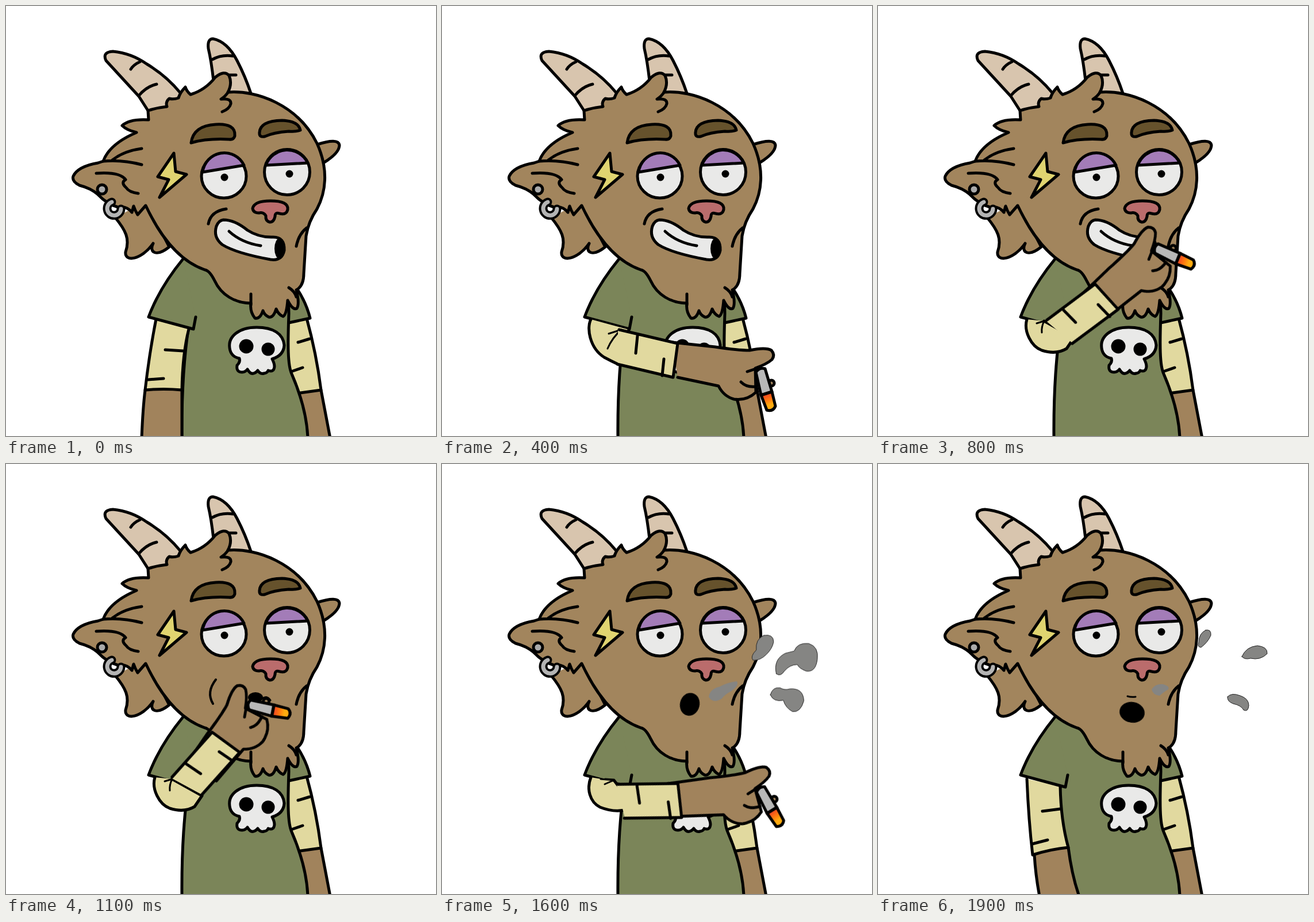
An HTML page without scripts for the animation above (2 s loop, 748 px wide and 748 px high).

```html
<!DOCTYPE html>
<html lang="en">
<head>
<meta charset="utf-8">
<title>Smoking goat</title>
<style>
html, body { margin: 0; width: 100%; height: 100%; overflow: hidden; background: #fff; }
svg { display: block; width: 100%; height: 100%; }
.ink { stroke: #000; stroke-width: 5; stroke-linecap: round; stroke-linejoin: round; fill: none; }
.fur { fill: #a2855d; }
.skin { fill: #a1835c; }
.shirt { fill: #7b8559; }
.wrap { fill: #e1d99f; }
.horn { fill: #d8c5ae; }
.bone { fill: #e9e9e8; }
.lid { fill: #a37cb8; }
.brow { fill: #66522c; }
.dark { fill: #000; }
.bare { stroke: none; }
.crease { stroke-width: 3; }
.smoke path { fill: #858583; stroke: #222; stroke-width: 1; }

/* every step lasts 100 ms, which is 5% of the loop */
.step { animation: 2s step-end infinite; }
.show { visibility: hidden; }
#arm-down { animation-name: arm-down; }
#arm-in { animation-name: arm-in; }
#forearm { animation-name: bent, swing; transform-origin: 283px 570px; }
#hand { animation-name: slide; }
#elbow-low { animation-name: elbow-low; }
#elbow-level { animation-name: elbow-level; }
#elbow-up { animation-name: elbow-up; }
#elbow-high { animation-name: elbow-high; }
#grin { animation-name: grin; }
#drag { animation-name: drag; }
#blow { animation-name: blow; }
#hole { animation-name: hole; }
#lip-a { animation-name: lip-a; }
#lip-b { animation-name: lip-b; }
#cloud { animation-name: cloud, drift; }
#puffs { animation-name: puffs, spread; transform-origin: 570px 360px; }
#wisps { animation-name: wisps, thin; transform-origin: 580px 360px; }

@keyframes arm-down { 0% { visibility: visible } 5%, 100% { visibility: hidden } }
@keyframes arm-in { 0%, 10% { visibility: hidden } 5%, 95%, 100% { visibility: visible } }
@keyframes bent { 0%, 95%, 100% { visibility: hidden } 10% { visibility: visible } }
@keyframes swing {
  0%, 10% { transform: rotate(48deg) }
  15% { transform: rotate(24deg) }
  20% { transform: rotate(0deg) }
  25% { transform: rotate(-21deg) }
  30% { transform: rotate(-42.5deg) }
  35% { transform: rotate(-46deg) }
  40% { transform: rotate(-50deg) }
  45% { transform: rotate(-54deg) }
  50% { transform: rotate(-58deg) }
  55% { transform: rotate(-61.5deg) }
  70% { transform: rotate(-44.3deg) }
  75% { transform: rotate(-28deg) }
  80% { transform: rotate(-14deg) }
  85% { transform: rotate(0deg) }
  90%, 100% { transform: rotate(45deg) }
}
@keyframes slide {
  0%, 30% { transform: none }
  35% { transform: translate(-14px, -2px) }
  40% { transform: translate(-28px, -5px) }
  45% { transform: translate(-43px, -7px) }
  50% { transform: translate(-57px, -10px) }
  55% { transform: translate(-71px, -12px) }
  70% { transform: translate(-23px, -8px) }
  75% { transform: translate(-14px, -5px) }
  80% { transform: translate(-7px, -2px) }
  85%, 100% { transform: none }
}
@keyframes elbow-low { 0%, 20%, 95%, 100% { visibility: hidden } 10%, 90% { visibility: visible } }
@keyframes elbow-level { 0%, 25%, 90%, 100% { visibility: hidden } 20%, 85% { visibility: visible } }
@keyframes elbow-up { 0%, 40%, 85%, 100% { visibility: hidden } 25%, 70% { visibility: visible } }
@keyframes elbow-high { 0%, 70%, 100% { visibility: hidden } 40% { visibility: visible } }
@keyframes grin { 0% { visibility: visible } 50%, 100% { visibility: hidden } }
@keyframes drag { 0%, 70%, 100% { visibility: hidden } 50% { visibility: visible } }
@keyframes blow { 0% { visibility: hidden } 70%, 100% { visibility: visible } }
@keyframes hole {
  0%, 70% { transform: translate(426px, 418px) scale(19, 16) }
  75% { transform: translate(428px, 418px) rotate(8deg) scale(18, 18) }
  80% { transform: translate(431px, 418px) rotate(14deg) scale(17, 20) }
  85% { transform: translate(433px, 418px) rotate(18deg) scale(16, 22) }
  90% { transform: translate(438px, 425px) rotate(12deg) scale(19, 20) }
  95%, 100% { transform: translate(442px, 432px) rotate(10deg) scale(22, 18) }
}
@keyframes lip-a { 0%, 75%, 100% { visibility: hidden } 70% { visibility: visible } }
@keyframes lip-b { 0% { visibility: hidden } 95%, 100% { visibility: visible } }
@keyframes cloud { 0%, 80%, 100% { visibility: hidden } 70% { visibility: visible } }
@keyframes drift { 0%, 70% { transform: none } 75%, 100% { transform: translate(22px, -15px) } }
@keyframes puffs { 0%, 90%, 100% { visibility: hidden } 80% { visibility: visible } }
@keyframes spread { 0%, 80% { transform: translate(-12px, 3px) scale(.94) } 85%, 100% { transform: none } }
@keyframes wisps { 0% { visibility: hidden } 90%, 100% { visibility: visible } }
@keyframes thin { 0%, 90% { transform: translate(-3px, 1px) scale(1.01) } 95%, 100% { transform: none } }
</style>
</head>
<body>
<svg viewBox="0 0 748 748" class="ink">
  <defs>
    <linearGradient id="ember" x1="0" y1="0" x2=".3" y2="1">
      <stop offset=".3" stop-color="#f4511e"/>
      <stop offset=".55" stop-color="#ff7a0f"/>
      <stop offset=".8" stop-color="#ffab0f"/>
    </linearGradient>
  </defs>

  <!-- far arm and shirt -->
  <path class="skin" d="M500 672L510 752H564L548 668"/>
  <path class="wrap" d="M484 550V638L500 675L512 673L548 668Q540 605 523 543"/>
  <path d="M508 585L528 579M496 636L516 629"/>
  <path class="shirt" d="M505 490Q522 515 529 543L492 551L489 528"/>
  <path class="shirt" d="M306 430L490 440L492 535C490 590 490 625 497 640Q523 700 525 752H306Q305 640 318 555"/>

  <g class="bone">
    <path d="M436 559C405 559 386 575 389 595Q391 610 406 613Q408 619 402 625Q400 637 411 637Q416 637 420 632Q425 641 431 639Q436 637 438 634Q442 641 449 639Q455 638 456 634Q466 638 467 627Q467 622 463 614Q483 608 484 590C482 570 465 559 436 559Z"/>
    <circle class="dark bare" cx="418" cy="592" r="12.5"/>
    <circle class="dark bare" cx="456" cy="597" r="11.5"/>
  </g>

  <g id="arm-down" class="step show">
    <path class="skin" d="M242 668Q238 700 236 752H306V668"/>
    <path class="wrap" d="M261 545Q250 600 242 668Q274 665 306 668Q307 605 318 562"/>
    <path d="M277 598L308 600M247 650L274 648"/>
  </g>
  <g id="arm-in" class="step show">
    <path class="skin" d="M272 680Q274 715 281 752H350Q337 715 331 667"/>
    <path class="wrap" d="M259 548Q262 620 269 680Q300 670 331 667Q318 620 317 560"/>
    <path d="M286 604L317 600M268 661L295 654"/>
  </g>
  <path class="shirt" d="M308 440Q267 490 248 541L326 562L330 541"/>

  <!-- head -->
  <path class="horn" d="M247 182L231 157L174 95Q167 80 186 79Q218 82 245 101Q280 122 304 152L290 178"/>
  <path d="M217 110Q222 102 233 97M231 156Q244 140 262 136"/>
  <path class="horn" d="M361 130Q357 95 352 74Q350 57 360 57Q385 62 402 95Q416 122 426 152L385 165"/>
  <path d="M359 93Q375 84 395 87M386 120L400 120"/>
  <path class="fur" d="M541 241Q578 229 580 242Q580 256 552 273"/>
  <path class="fur" d="M190 368C208 390 216 405 208 428C206 446 236 442 256 413C248 429 262 437 284 419L243 340"/>
  <path class="fur" d="M247 182Q262 177 280 175Q277 167 284 161Q291 163 300 160Q303 150 312 141Q314 148 321 154Q347 146 364 124Q380 111 388 121Q394 135 386 150C436 146 508 172 541 239C562 285 556 325 541 353Q526 375 522 400L518 465Q518 487 505 494Q511 518 506 526Q499 530 490 512Q488 537 482 540Q474 537 470 527Q465 543 457 541Q449 537 447 530Q442 545 433 543Q424 532 426 517C398 517 374 502 363 478Q354 460 346 459C300 443 268 400 243 347L229 363Q225 357 222 348L219 359Q210 347 195 350Q176 345 160 328Q148 317 128 312Q114 305 117 296Q125 279 160 273L169 270Q180 240 227 220Q210 216 202 208Q215 196 248 198Z"/>
  <path d="M387 149Q382 157 374 162Q392 160 391 170Q389 179 376 184M169 270Q202 267 236 276M185 268Q205 252 236 248M157 291Q198 288 208 302Q199 307 209 316Q214 324 230 326M523 386Q509 397 505 418M492 490Q502 496 505 506M426 501V520"/>
  <circle cx="167" cy="319" r="8" fill="#aaa"/>
  <path stroke-width="15" d="M184 341A12 12 0 1 0 200 353"/>
  <path style="stroke:#b4b4b4;stroke-width:7" d="M184 341A12 12 0 1 0 200 353"/>
  <path fill="#e0d470" d="M292 256L264 297L283 302L267 333L314 293L295 288Z"/>
  <path class="brow" d="M322 238Q326 208 365 206Q400 204 398 226Q396 233 388 232Q350 230 322 238Z"/>
  <path class="brow" d="M441 220Q442 200 480 199Q509 200 512 216Q505 219 492 218Q465 220 450 227Q440 229 441 220Z"/>
  <ellipse class="bone" cx="379" cy="296" rx="39" ry="38"/>
  <path class="lid" d="M342 289A38 38 0 0 1 414 277Z"/>
  <circle class="bone" cx="489" cy="289" r="39.5"/>
  <path class="lid" d="M452 277A39.5 39.5 0 0 1 525 273Z"/>
  <g class="dark bare">
    <circle cx="380" cy="298" r="6.5"/>
    <circle cx="493" cy="292" r="6.5"/>
  </g>
  <path fill="#ba6c6c" d="M429 352Q432 339 460 339Q492 339 490 354Q488 364 476 361Q468 358 468 366Q466 376 459 376Q451 374 452 365Q448 358 440 360Q430 360 429 352Z"/>

  <!-- mouths -->
  <g id="grin" class="step show">
    <path d="M352 379Q356 357 383 353"/>
    <path class="bone" d="M378 372Q398 372 420 390Q440 403 465 402Q485 402 484 425Q480 444 460 441Q400 430 376 415Q360 402 366 383Q370 373 378 372Z"/>
    <ellipse class="dark bare" cx="476" cy="422" rx="9" ry="18"/>
    <path d="M388 392Q410 412 443 417"/>
  </g>
  <g id="drag" class="step show">
    <path stroke-width="4" d="M365 375Q348 397 360 417"/>
    <ellipse class="dark bare" cx="434" cy="406" rx="13" ry="9"/>
    <path class="crease" d="M446 408Q454 402 460 411"/>
  </g>
  <g id="blow" class="step show">
    <circle id="hole" class="step dark bare" r="1"/>
    <path id="lip-a" class="step show" stroke-width="2" d="M427 395L446 402"/>
    <path id="lip-b" class="step show crease" d="M434 404Q440 406 448 405"/>
  </g>

  <g class="smoke">
    <path id="cloud" class="step show" style="stroke:none" d="M446 415Q450 400 470 388Q488 372 505 374Q515 352 545 350Q562 353 562 366Q582 360 592 385Q595 402 582 408Q578 426 556 426Q535 426 520 405Q505 402 490 404Q470 405 460 420Q450 424 446 415Z"/>
    <g id="puffs" class="step show">
      <path d="M572 291Q590 288 590 303Q588 315 577 326Q565 338 552 337Q546 330 558 318Q556 298 572 291Z"/>
      <path d="M595 362Q589 335 612 324L628 320Q634 304 655 306Q674 312 671 335Q668 360 650 357Q637 352 634 345Q620 345 610 357Q603 368 595 362Z"/>
      <path d="M584 401Q588 386 602 388Q610 393 620 390Q645 388 646 412Q640 434 625 432Q612 425 608 411Q590 415 584 401Z"/>
      <path style="stroke:none" d="M470 405Q472 390 490 386Q505 378 522 376Q527 383 512 394Q500 400 494 408Q478 418 470 405Z"/>
    </g>
    <g id="wisps" class="step show">
      <path d="M570 289Q580 287 579 298Q574 310 562 319Q555 319 558 310Q558 295 570 289Z"/>
      <path d="M633 335Q640 318 660 316Q678 318 677 330Q665 342 648 338Q638 341 633 335Z"/>
      <path d="M608 405Q615 397 630 403Q645 408 645 420Q644 432 636 428Q632 420 618 417Q607 413 608 405Z"/>
      <path style="stroke:none" d="M476 392Q482 382 495 383Q508 386 505 392Q495 398 490 403Q478 402 476 392Z"/>
    </g>
  </g>

  <!-- bent arm -->
  <g class="wrap">
    <path id="elbow-low" class="step show" d="M259 545Q252 590 268 622L300 615L322 563"/>
    <g id="elbow-level" class="step show">
      <path d="M259 545C251 560 257 595 282 611Q295 618 308 624L325 563"/>
      <path class="crease" d="M290 570L312 563Q296 577 288 596"/>
    </g>
    <g id="elbow-up" class="step show">
      <path d="M259 545C251 565 257 588 275 597Q300 607 322 601L334 596L299 550L284 549"/>
      <path class="crease" d="M276 548L299 550L283 557"/>
    </g>
    <g id="elbow-high" class="step show">
      <path d="M259 545C253 565 266 592 285 599Q310 607 328 596L341 577L289 548"/>
      <path class="crease" d="M276 552L289 548Q284 558 285 568"/>
    </g>
  </g>
  <g id="forearm" class="step show">
    <g id="hand" class="step">
      <circle cx="573" cy="656" r="5" class="skin"/>
      <path class="skin" d="M400 585L475 593Q515 599 535 599Q563 593 573 599Q580 607 574 615Q565 623 545 630L546 672Q530 687 508 684Q490 679 481 661L410 646"/>
      <path d="M520 654Q530 664 546 662M531 636L546 631"/>
      <path fill="#b8b8b8" d="M546 637Q552 628 562 631L574 671L555 677Z"/>
      <path fill="url(#ember)" d="M555 677L574 671L580 696Q576 706 565 703Z"/>
    </g>
    <path class="wrap bare" d="M306 562L410 587L402 646L306 623Z"/>
    <path d="M308 563L410 587L402 646L305 623M340 574L337 604M386 614L383 643"/>
  </g>
</svg>
</body>
</html>
```
